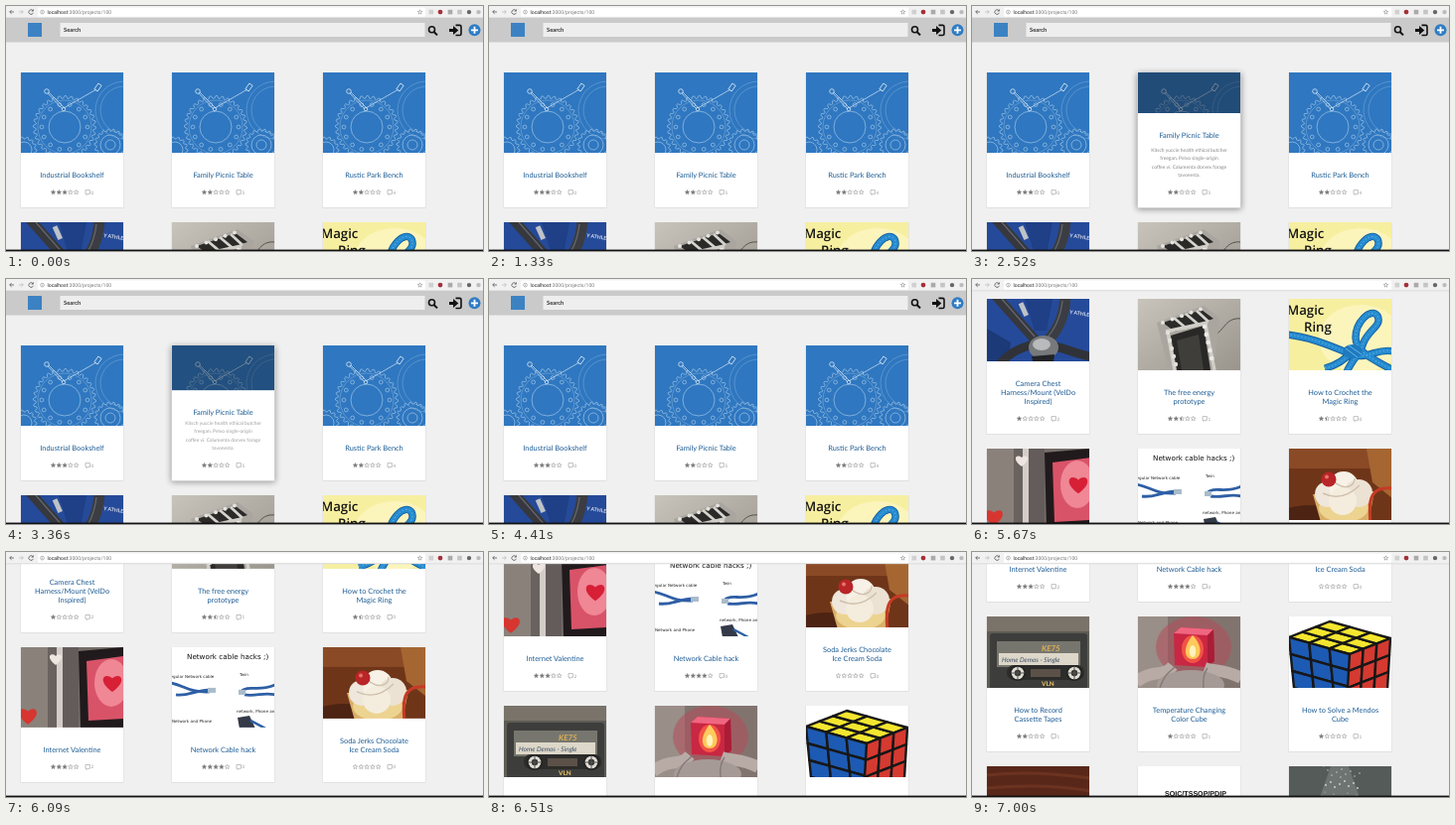
An HTML page that plays this animation: 480 px wide and 247 px high, repeating every 7070 ms.

```html
<!DOCTYPE html>
<html lang="en">
<head>
<meta charset="utf-8">
<title>Projects</title>
<style>
  html, body { margin: 0; width: 100%; height: 100%; overflow: hidden; background: #f0f0f0; }
  #stage { display: block; width: 480px; height: 247px; font-family: Lato, sans-serif; text-rendering: geometricPrecision; }
  .title { font-size: 7.4px; fill: #1d5c94; text-anchor: middle; }
  .desc { font-size: 4.95px; fill: #858585; text-anchor: middle; }
  .wide { font-family: "DejaVu Sans", sans-serif; }
</style>
</head>
<body>
<svg id="stage" viewBox="0 0 480 247"></svg>
<script>
const LOOP = 7070, STEP = 70, CARD_W = 103, CARD_H = 136, PITCH = 151, LIFT = 40;
const stage = document.getElementById('stage');

// --- drawing helpers ---
const rect = (x, y, w, h, fill, more = '') => `<rect x="${x}" y="${y}" width="${w}" height="${h}" fill="${fill}" ${more}/>`;
const circle = (x, y, r, fill, more = '') => `<circle cx="${x}" cy="${y}" r="${r}" fill="${fill}" ${more}/>`;
const oval = (x, y, rx, ry, fill, more = '') => `<ellipse cx="${x}" cy="${y}" rx="${rx}" ry="${ry}" fill="${fill}" ${more}/>`;
const poly = (points, fill, more = '') => `<polygon points="${points}" fill="${fill}" ${more}/>`;
const line = (d, color, width = 1, more = '') => `<path d="${d}" fill="none" stroke="${color}" stroke-width="${width}" ${more}/>`;
const text = (x, y, size, str, fill, more = '') => `<text x="${x}" y="${y}" font-size="${size}" fill="${fill}" ${more}>${str}</text>`;
const range = n => [...Array(n).keys()];
const polar = (x, y, r, a) => `${(x + r * Math.cos(a)).toFixed(2)},${(y + r * Math.sin(a)).toFixed(2)}`;

function star(x, y, r, fill, stroke) {
  const points = range(10).map(i => polar(x, y, i % 2 ? r * .45 : r, Math.PI * (i / 5 - .5)));
  return poly(points.join(' '), fill, `stroke="${stroke}" stroke-width=".5"`);
}

function gear(x, y, r, teeth, depth) {
  const points = range(teeth * 4).map(i => polar(x, y, i % 4 < 2 ? r : r - depth, 2 * Math.PI * i / (teeth * 4)));
  return poly(points.join(' '), 'none');
}

const heart = (x, y, s, fill) =>
  `<path transform="translate(${x} ${y}) scale(${s})" fill="${fill}" d="M0 8C-14-2-7-10 0-4 7-10 14-2 0 8Z"/>`;

// --- pictures, each drawn from the card's top left corner ---
function blueprint() {
  const holes = range(14).map(i => {
    const [x, y] = polar(44, 55, 23, i * Math.PI / 7).split(',');
    return circle(x, y, 1.9, 'none');
  });
  return rect(0, 0, CARD_W, 82, '#2f77c0') +
    `<g fill="none" stroke="#b5d3ec" stroke-width=".7" opacity=".85">` +
    circle(44, 55, 16, 'none') + circle(44, 55, 27, 'none', 'stroke-width=".4"') + gear(44, 55, 31.5, 32, 2.6) + holes.join('') +
    gear(90, 73, 16, 18, 2.2) + circle(90, 73, 10, 'none') + circle(90, 73, 5, 'none') +
    gear(3, 78, 13, 14, 2) + circle(3, 78, 8, 'none') +
    circle(104, 38, 24, 'none', 'stroke-width=".35"') + circle(104, 38, 29, 'none', 'stroke-width=".35"') +
    `</g><g fill="none" stroke="#d5e6f4" stroke-width=".8">` +
    circle(26, 19, 2.3, 'none') + line('M27 21L42 37M28 20L44 36M43 36L76 17', '#d5e6f4', .7) + circle(43, 37, 1.8, 'none') +
    rect(74, 13, 7, 4, 'none', 'transform="rotate(-55 77.5 15)"') + '</g>';
}

const harness = () => rect(0, 0, CARD_W, 72, '#254a99') +
  poly('38,0 66,0 60,32 48,32', '#1f3f86') + poly('0,30 24,44 20,72 0,72', '#1c3978') +
  line('M9-3L51 44', '#36383d', 10) + line('M79-3C78 20 70 34 56 48', '#3b3d42', 11) +
  line('M53 44C30 50 18 56 8 74M58 46C76 48 90 56 104 58', '#303238', 9) +
  line('M15 0L48 38M76 2C74 20 68 32 58 42', '#666a70', 1.2) +
  rect(34, 4, 5, 14, '#bfc3c6', 'transform="rotate(-24 36 10)"') +
  oval(57, 49, 15, 12, '#777a7c') + oval(55, 46, 9, 6, '#b8babb') + poly('45,58 68,56 66,72 48,72', '#222327') +
  text(83, 15, 5.2, 'Y ATHLET', '#dde2ef', 'font-weight="700" transform="rotate(8 83 15)"');

function tower() {
  const bolts = range(5).map(i =>
    circle(30 + i * 2, 34 + i * 8, 2.2, '#e2e0db') + circle(67 + i * 1.8, 28 + i * 8, 2.3, '#eceae6') +
    circle(25 + i * 9.5, 24 - i * 3.4, 2, '#e5e3df'));
  return rect(0, 0, CARD_W, 72, 'url(#grey)') +
    line('M70 40C88 35 86 18 104 20', '#55534f', 1) +
    poly('19,24 66,7 82,19 76,72 31,72', '#aaa69f') +
    poly('25,24 64,11 76,20 37,33', '#2b2a28') + line('M36 19L49 30M48 15L61 26M59 12L71 23', '#d5d3ce', 2.8) +
    poly('33,37 66,27 73,72 39,72', '#292826') + poly('39,42 61,36 66,72 44,72', '#403e3b') +
    line('M30 34L37 72M68 26L77 72M28 33L70 24', '#d1cec8', 3.4) + bolts.join('');
}

function ring() {
  const yarn = 'M-2 36C20 38 42 47 60 55S88 49 105 53M58 74C63 62 72 55 75 44C81 30 94 27 89 17C82 8 67 24 67 39C67 52 80 59 105 72M36 70C49 67 58 60 66 51';
  return rect(0, 0, CARD_W, 72, '#f7efa0') + oval(72, 40, 42, 34, '#fbf5bc') +
    line(yarn, '#145c9e', 7.4) + line(yarn, '#258bd0', 5.6) + line(yarn, '#69b5e4', 1, 'stroke-dasharray="1.4 2.2"') +
    oval(64, 53, 10, 7, '#1e7ac0') + line('M57 50L69 59M60 47L73 56', '#69b5e4', 1) +
    `<g font-family="Open Sans, sans-serif" font-weight="600">` +
    text(-2, 16, 13.2, 'Magic', '#151515') + text(15, 33, 13.2, 'Ring', '#151515') + '</g>';
}

const valentine = () => rect(0, 0, CARD_W, 82, '#756d69') + rect(0, 0, 27, 82, '#8a817b') +
  rect(27, 0, 9, 82, '#69625f') + rect(36, 0, 6, 82, '#d3cdc8') + rect(42, 0, 16, 82, '#645c5b') +
  poly('58,4 104,0 104,82 60,82', '#211a1c') + poly('66,14 104,9 104,72 68,74', '#d95368') +
  oval(91, 36, 17, 24, '#ef8795') + heart(92, 36, 1.15, '#d71f36') + heart(35, 12, .75, '#eee4e0') + heart(7, 69, 1.1, '#d6362f');

function cables() {
  const wire = 'M-2 36C12 38 16 46 38 45M4 48C16 50 24 43 40 43M69 45C78 37 86 46 104 38M73 48C85 50 92 45 104 48';
  return rect(0, 0, CARD_W, 82, '#fff') + '<g class="wide">' +
    text(15, 12, 7.2, 'Network cable hacks ;)', '#111') + text(-3, 31, 4.1, 'regular Network cable', '#222') +
    text(68, 29, 4.1, 'Twin', '#222') + text(0, 76, 4.1, 'Network and Phone', '#222') +
    text(65, 66, 4.1, 'network, Phone and', '#222') + '</g>' +
    line(wire, '#2e5fa5', 2.8) + rect(36, 41, 8, 5, '#a9bccb') + rect(67, 43, 7, 5, '#a9bccb') +
    poly('66,71 78,69 84,82 68,82', '#343a48') + line('M79 74L94 82', '#2e5fa5', 2.5);
}

const soda = () => rect(0, 0, CARD_W, 72, '#6f3519') + rect(0, 0, CARD_W, 20, '#8a4a25') + poly('78,0 104,0 104,50 84,34', '#a66632') +
  oval(22, 74, 40, 17, '#4d2413') + poly('24,46 86,43 80,74 32,74', '#d9b069') + oval(55, 60, 25, 14, '#ecd390') +
  circle(39, 46, 13, '#efe7dc') + circle(55, 38, 15, '#f7f1e7') + circle(70, 45, 14, '#ece2d3') + circle(54, 53, 14, '#f4ecdd') +
  line('M34 45C47 51 59 49 71 37M45 33C56 43 66 38 66 30', '#cfc0ad', 1.4) +
  line('M82 74C79 48 84 38 104 40', '#c63a24', 3) + circle(40, 31, 7.5, '#b92528') + circle(38, 28.5, 2, '#e6756b');

function cassette() {
  const reel = x => circle(x, 57, 8, '#232321') + circle(x, 57, 6.3, '#dedcd4') + circle(x, 57, 3.2, '#35342f') +
    line(`M${x - 6} 57H${x + 6}M${x} 51V63`, '#555', 1);
  return rect(0, 0, CARD_W, 72, '#5e5b54') + rect(0, 0, CARD_W, 15, '#79736a') +
    rect(3, 17, 98, 57, '#3d3e3c', 'rx="3"') + rect(10, 25, 84, 26, '#77766e') +
    text(55, 35, 8, 'KE75', '#dfb254', 'font-weight="700" font-style="italic"') +
    rect(12, 37, 80, 12, '#ddd7c9') + text(15, 45.5, 6.6, 'Home Demos - Single', '#3c4c63', 'font-style="italic"') +
    rect(20, 49, 78, 15, '#2c2c2a', 'rx="7"') + rect(44, 53, 30, 8, '#5c5148') + reel(31) + reel(88) +
    text(55, 70, 6.3, 'VLN', '#d5b45f', 'font-weight="900"');
}

const glowCube = () => rect(0, 0, CARD_W, 72, '#81746f') + rect(0, 0, 30, 72, '#998e88') +
  oval(56, 31, 38, 31, '#b44d5a', 'opacity=".55"') +
  poly('36,17 43,11 76,13 77,45 70,51 37,49', '#c92743') + poly('36,17 43,11 76,13 70,19', '#f06680') +
  poly('70,19 76,13 77,45 70,51', '#a91d36') + oval(55, 33, 11, 14, '#f25445') +
  `<path d="M55 19C66 30 64 43 55 43S45 31 55 19Z" fill="#ffc95c"/>` + oval(55, 35, 3.2, 6, '#fff3ba') +
  line('M-2 66C16 52 25 62 35 50M104 62C87 53 78 56 67 52', '#b8aba6', 12) + oval(53, 69, 34, 15, '#a69a96') +
  line('M22 72C27 57 32 56 37 51M66 72C65 62 67 56 70 52', '#857a77', 1.4);

function puzzle() {
  // One face: corner plus two edge vectors, divided three by three
  const face = (x, y, ux, uy, vx, vy, fill) => range(9).map(i => {
    const a = i % 3, b = Math.floor(i / 3);
    const at = (s, t) => `${x + (ux * s + vx * t) / 3},${y + (uy * s + vy * t) / 3}`;
    return poly([at(a, b), at(a + 1, b), at(a + 1, b + 1), at(a, b + 1)].join(' '), fill,
      'stroke="#171717" stroke-width="2.4" stroke-linejoin="round"');
  }).join('');
  return rect(0, 0, CARD_W, 72, '#fff') + face(0, 21, 41, -16, 61, 17, '#f4e62f') +
    face(0, 21, 61, 17, 5, 51, '#1d5ab3') + face(61, 38, 41, -16, -3, 51, '#d53a31');
}

const wood = () => rect(0, 0, CARD_W, 72, '#592719') + line('M0 9Q45 4 104 12M0 22Q60 17 104 25', '#6b3320', 3);
const chips = () => rect(0, 0, CARD_W, 72, '#fff') +
  text(27, 30, 7.1, 'SOIC/TSSOP/PDIP', '#111', 'font-family="Liberation Sans, sans-serif" font-weight="700"');
const fountain = () => rect(0, 0, CARD_W, 72, '#555b59') + poly('42,0 60,0 74,40 28,40', '#6d7472') +
  range(26).map(i => circle(35 + (i * 17) % 37, (i * 11) % 34, .5 + i % 3 * .2, '#d3d9d6')).join('');

// picture, title lines, stars, comments
const cards = [
  [blueprint, ['Industrial Bookshelf'], 3, 0],
  [blueprint, ['Family Picnic Table'], 2, 5],
  [blueprint, ['Rustic Park Bench'], 2, 4],
  [harness, ['Camera Chest', 'Harness/Mount (VelDo', 'Inspired)'], 1, 2],
  [tower, ['The free energy', 'prototype'], 2.5, 1],
  [ring, ['How to Crochet the', 'Magic Ring'], 1.5, 0],
  [valentine, ['Internet Valentine'], 3, 2],
  [cables, ['Network Cable hack'], 4, 0],
  [soda, ['Soda Jerks Chocolate', 'Ice Cream Soda'], 0, 0],
  [cassette, ['How to Record', 'Cassette Tapes'], 2, 1],
  [glowCube, ['Temperature Changing', 'Color Cube'], 1, 1],
  [puzzle, ['How to Solve a Mendos', 'Cube'], 1, 1],
  [wood, ['Walnut Desk Tray'], 2, 0],
  [chips, ['Chip Adapter Board'], 3, 1],
  [fountain, ['Garden Fountain'], 2, 0]
];
const blurb = ['Kitsch yuccie health ethical butcher', 'freegan. Pelvo single-origin', 'coffee vi. Calumenta dorvex forage', 'tavonesta.'];

function rating(stars, comments) {
  const row = range(5).map(i =>
    star(32.5 + i * 5.8, 120.8, 2.4, stars >= i + 1 ? '#777' : stars > i ? 'url(#half)' : '#fff', '#888'));
  return row.join('') + line('M65 118.6h4.4v3.8h-2l-1.2 1.2v-1.2H65z', '#999', .6) + text(70.5, 122.5, 4.6, comments, '#999');
}

function card([picture, lines, stars, comments], i) {
  const x = 15 + i % 3 * 152, y = 67 + Math.floor(i / 3) * PITCH, top = 90 - lines.length * 9;
  const title = lines.map((s, k) => `<text class="title" x="51.5" y="${105.7 - (lines.length - 1 - k) * 9}">${s}</text>`).join('');
  const hover = i === 1;
  return (hover ? rect(x - 1, y + 1, CARD_W + 2, CARD_H + 1, '#000', 'id="shadow" filter="url(#blur)" opacity="0"') : '') +
    rect(x - .5, y, CARD_W + 1, CARD_H + .8, '#dcdcdc') +
    `<svg x="${x}" y="${y}" width="${CARD_W}" height="${CARD_H}">` + picture() +
    (hover ? rect(0, 0, CARD_W, 82, '#101820', 'id="shade" opacity="0"') : '') +
    `<g ${hover ? 'id="panel"' : ''}>` + rect(0, top, CARD_W, CARD_H, '#fff') + title + '</g>' +
    (hover ? '<g id="blurb" opacity="0">' + blurb.map((s, k) => `<text class="desc" x="51.5" y="${79.8 + k * 8.5}">${s}</text>`).join('') + '</g>' : '') +
    rating(stars, comments) + '</svg>';
}

const header = rect(0, 12, 480, 24.5, '#cacaca') + rect(22, 17, 14, 14, '#3c82c3') +
  rect(54.5, 17, 367, 14, '#eee') + text(58, 26.2, 5.8, 'Search', '#333', 'font-weight="700"') +
  circle(428.5, 23.8, 3, 'none', 'stroke="#111" stroke-width="1.6"') + line('M430.8 26.2L434 29.4', '#111', 2) +
  line('M452.5 19.4H456.5Q458 19.4 458 21V28Q458 29.5 456.5 29.5H452.5', '#111', 1.6) +
  `<path d="M446 22.9H450V19.9L455.3 24.4L450 29V26H446Z" fill="#111"/>` +
  circle(471.5, 24.3, 6, '#2f7cc4') + line('M468 24.3H475M471.5 20.8V27.8', '#fff', 1.8);

const browser = rect(0, 0, 480, 12, '#f1f1f1') + rect(32, 1.5, 390, 9.2, '#fff', 'rx="1"') +
  line('M8 6H3.8M5.6 4.1L3.7 6L5.6 7.9', '#555', .8) + line('M13 6H17.2M15.4 4.1L17.3 6L15.4 7.9', '#bbb', .8) +
  line('M27 4.6A2.3 2.3 0 1 0 27.4 6.8M27.4 3.4V5.1H25.7', '#555', .8) +
  circle(36.5, 6.1, 1.9, 'none', 'stroke="#777" stroke-width=".5"') + line('M36.5 5.7V7.2M36.5 4.8V5.2', '#777', .5) +
  `<text x="41.5" y="7.9" font-size="5.1" font-family="Roboto, sans-serif" fill="#222">localhost<tspan fill="#777">:3000/projects/100</tspan></text>` +
  star(416.5, 6.2, 2.4, '#fff', '#777') +
  rect(425.5, 3.8, 4.6, 4.6, '#d0d0d0') + circle(437, 6.1, 2.4, '#a52f37') + rect(444.7, 3.8, 4.6, 4.6, '#aaa') +
  rect(454.2, 3.8, 4.6, 4.6, '#c4c4c4') + circle(466, 6.1, 2.2, '#666') + circle(475.5, 6.1, 2.2, '#bbb') +
  line('M0 11.8H480', '#c7c7c7', .5);

stage.innerHTML = `<defs>
  <linearGradient id="half"><stop offset=".5" stop-color="#777"/><stop offset=".5" stop-color="#fff"/></linearGradient>
  <linearGradient id="grey" x2="1" y2="1"><stop stop-color="#c8c4bc"/><stop offset="1" stop-color="#99958d"/></linearGradient>
  <filter id="blur" x="-20%" y="-20%" width="140%" height="140%"><feGaussianBlur stdDeviation="3"/></filter></defs>` +
  rect(0, 0, 480, 247, '#f0f0f0') + `<g id="page">${header}${cards.map(card).join('')}</g>` +
  browser + rect(0, 245.6, 480, 1.4, '#111');

// --- motion ---
const [page, shadow, shade, panel, blurbBox] = ['page', 'shadow', 'shade', 'panel', 'blurb'].map(id => document.getElementById(id));
const ease = (t, from, to) => {
  const p = Math.min(1, Math.max(0, (t - from) / (to - from)));
  return p * p * (3 - 2 * p);
};

// time, offset, speed
const scrollKeys = [[4480, 0, 0], [5110, 144, .17], [5670, 198, .12], [6510, 365, .2], [7000, 455, .17]];

function scrollAt(t) {
  const k = scrollKeys.findIndex(key => t < key[0]);
  if (k < 0) return 455;
  if (k === 0) return 0;
  const [t0, y0, v0] = scrollKeys[k - 1], [t1, y1, v1] = scrollKeys[k];
  const d = t1 - t0, p = (t - t0) / d, q = 1 - p;
  return y0 * q * q * (1 + 2 * p) + y1 * p * p * (3 - 2 * p) + d * p * q * (v0 * q - v1 * p);
}

function stepTime(ms) {
  const n = Math.floor(ms / STEP);
  const held = n === 1 || n > 0 && (n % 15 === 0 || n % 15 === 8);
  return (held ? n - 1 : n) * STEP;
}

const start = performance.now();
function draw() {
  const t = stepTime((performance.now() - start) % LOOP);
  const h = ease(t, 1500, 1800) * (1 - ease(t, 3300, 3600));
  page.setAttribute('transform', `translate(0 ${-scrollAt(t)})`);
  panel.setAttribute('transform', `translate(0 ${-LIFT * h})`);
  shadow.setAttribute('opacity', .4 * h);
  shade.setAttribute('opacity', .45 * h);
  blurbBox.setAttribute('opacity', h * h);
  requestAnimationFrame(draw);
}
draw();
</script>
</body>
</html>
```
